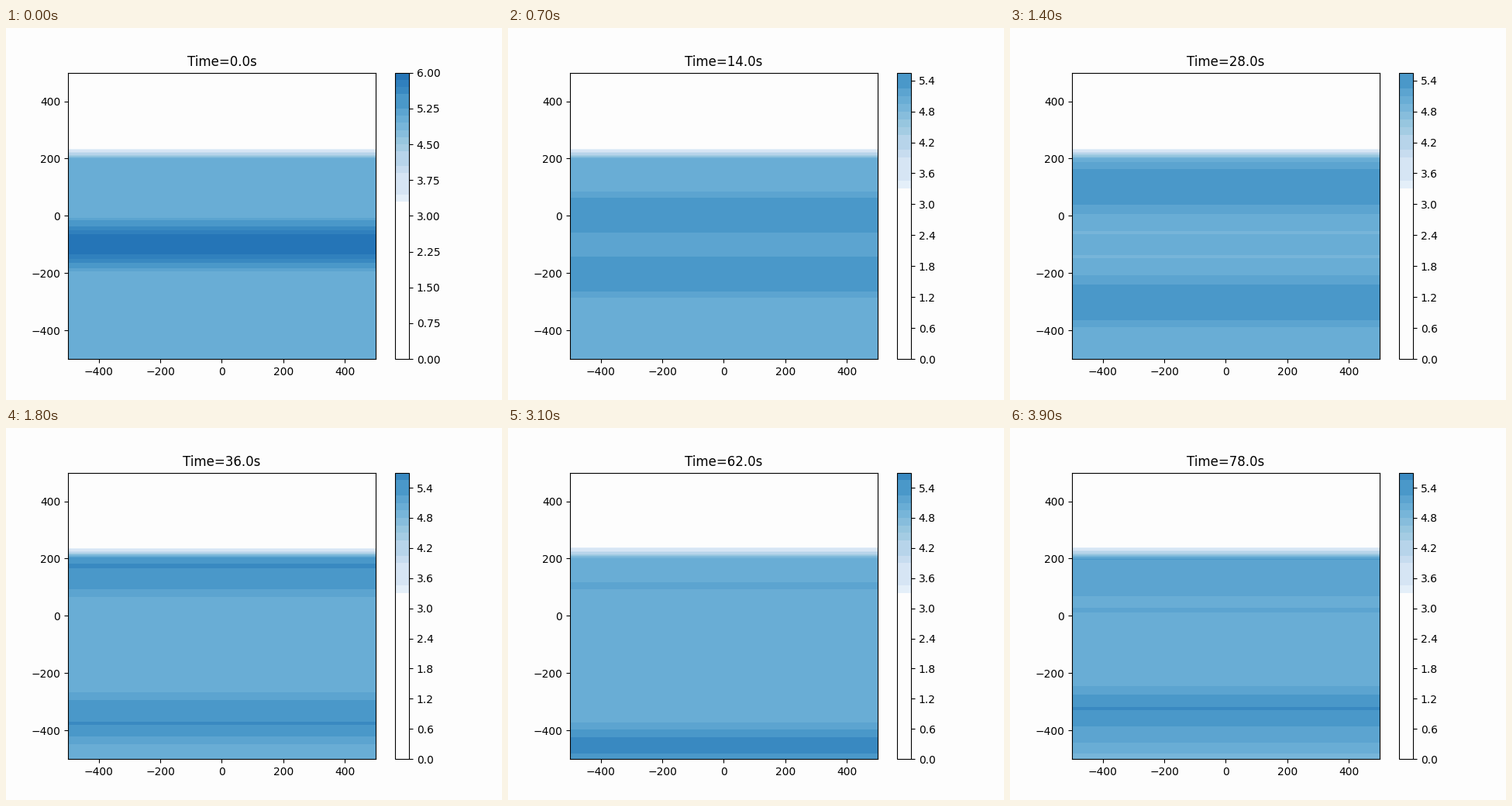
These frames come from a looping animation (640 px wide and 480 px high, 4 s). A matplotlib script:

```python
import numpy as np
import matplotlib.pyplot as plt
from matplotlib.animation import FuncAnimation

FRAMES, INTERVAL = 40, 100
SECONDS_PER_FRAME = 2.0
GRAVITY, DEPTH = 9.81, 5.0
DX, DT = 2.5, 0.125
DISPERSION = 100.0
STEP = 0.15
PAPER = "#fdfdfd"

y = np.arange(-500 + DX / 2, 500, DX)
bed = 0.05 * np.maximum(y - 200, 0)


def start_depth():
    d = np.abs(y + 100)
    bump = np.where(d < 100, np.cos(np.pi * d / 200), 0)
    return np.maximum(DEPTH - bed, 0) + bump


def dispersion_inverse():
    """Inverse of (1 - B d2/dy2) on the inner cell faces."""
    faces = y[:-1] + DX / 2
    n = len(faces)
    b = np.where(faces < 260, DISPERSION, 0) / DX ** 2
    second = -2 * np.eye(n) + np.eye(n, k=1) + np.eye(n, k=-1)
    return np.linalg.inv(np.eye(n) - b[:, None] * second)


def upwind(h, u):
    return np.where(u > 0, h[:-1], h[1:])


def simulate():
    """Depth profiles of a wave splitting, hitting a wall and a beach."""
    inverse = dispersion_inverse()
    h = start_depth()
    u = np.zeros(len(y) - 1)
    profiles = [h.copy()]
    for _ in range(FRAMES - 1):
        for _ in range(round(SECONDS_PER_FRAME / DT)):
            slope = np.diff(np.pad(u, 1)) / DX
            advection = u * np.where(u > 0, slope[:-1], slope[1:])
            force = -GRAVITY * np.diff(h + bed) / DX - advection
            force[np.maximum(h[:-1], h[1:]) < 0.01] = 0
            u = np.clip(u + DT * (inverse @ force), -6, 6)
            u[upwind(h, u) < 0.01] = 0
            flux = np.pad(upwind(h, u) * u, 1)
            h = np.maximum(h - DT / DX * np.diff(flux), 0)
        profiles.append(h.copy())
    return profiles


def band_colors(count):
    """Blues from depth 3 to 7; some neighbouring bands share a shade."""
    middle = np.arange(count) + 0.5
    for first, last in ((23, 25), (27, 28), (35, 36)):
        middle[first:last + 1] = (first + last + 1) / 2
    colors = list(plt.get_cmap("Blues")((middle * STEP - 3) / 4))
    colors[:22] = [PAPER] * 22
    return colors


plt.rcParams.update({"figure.facecolor": PAPER, "axes.facecolor": PAPER,
                     "savefig.facecolor": PAPER})
profiles = simulate()
colors = band_colors(60)
rows = np.concatenate(([-500], y, [500]))
fig = plt.figure(figsize=(6.4, 4.8), dpi=100)


def draw(i):
    fig.clear()
    ax = fig.add_subplot()
    depth = np.pad(profiles[i], 1, mode="edge")
    bands = int(np.ceil(depth.max() / STEP - 1e-9))
    levels = np.round(np.arange(bands + 1) * STEP, 2)
    filled = ax.contourf([-500, 500], rows, np.column_stack((depth, depth)),
                         levels=levels, colors=colors[:bands])
    fig.colorbar(filled, ax=ax)
    ax.set_title(f"Time={i * SECONDS_PER_FRAME:.1f}s")
    return []


anim = FuncAnimation(fig, draw, frames=FRAMES, interval=INTERVAL,
                     repeat=True, repeat_delay=0)
plt.show()
```
